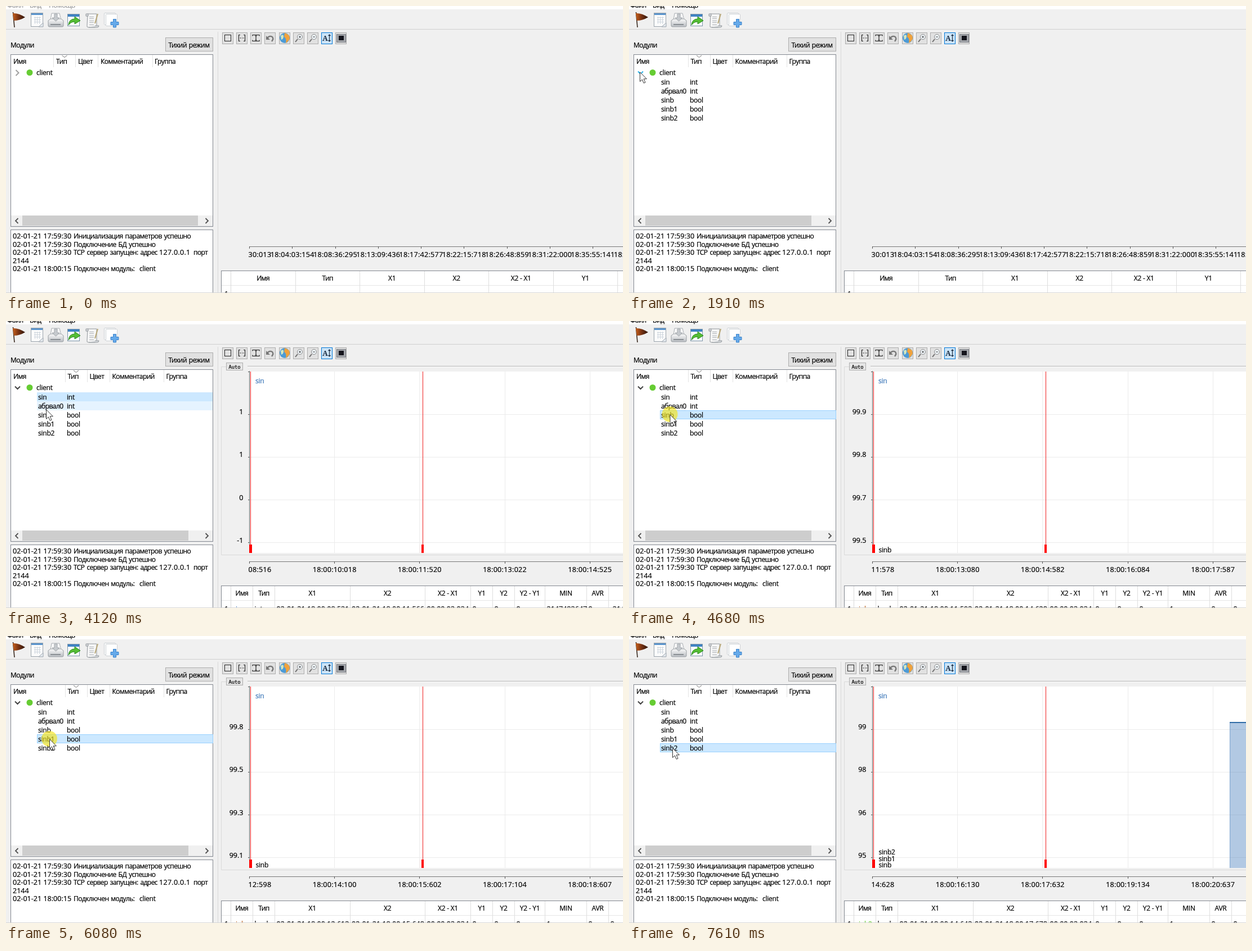
An HTML page for the animation above (8 s loop, 1096 by 511 pixels).

```html
<!DOCTYPE html>
<html lang="ru">
<head>
<meta charset="utf-8">
<title>Модули</title>
<style>
  html, body { margin: 0; width: 100%; height: 100%; overflow: hidden; background: #f0f0f0; }
  svg { display: block; }
  text { font: 12px "Open Sans", "Noto Sans", sans-serif; letter-spacing: -.25px; white-space: pre; stroke-width: .22px; }
  .cyr { letter-spacing: -.55px; word-spacing: 1.3px; }
  .num { font-size: 12.55px; letter-spacing: 0; }
  .wide { font-size: 12.55px; letter-spacing: .27px; }
  .mono { font: 8.8px "DejaVu Sans Mono", monospace; letter-spacing: 0; }
  rect, line { shape-rendering: crispEdges; }
</style>
</head>
<body>
<svg width="1096" height="511" viewBox="0 0 1096 511">
  <defs>
    <clipPath id="axis"><rect x="431" y="420" width="665" height="40"/></clipPath>
    <linearGradient id="flag"><stop offset="0" stop-color="#c8601c"/><stop offset=".45" stop-color="#7a3414"/><stop offset="1" stop-color="#2a130b"/></linearGradient>
    <linearGradient id="metal" x2="0" y2="1"><stop offset="0" stop-color="#fafafa"/><stop offset="1" stop-color="#b9bdc2"/></linearGradient>
  </defs>
  <g id="base"></g>
  <g id="live"></g>
</svg>
<script>
const LOOP = 8000;
const $ = id => document.getElementById(id);

const line = (x1, y1, x2, y2, c, w = 1) =>
  `<line x1="${x1}" y1="${y1}" x2="${x2}" y2="${y2}" stroke="${c}" stroke-width="${w}"/>`;
const fill = (x, y, w, h, c) => `<rect x="${x}" y="${y}" width="${w}" height="${h}" fill="${c}"/>`;
const box = (x, y, w, h, c, edge) =>
  `<rect x="${x + .5}" y="${y + .5}" width="${w - 1}" height="${h - 1}" fill="${c}" stroke="${edge}"/>`;
const path = (d, stroke, w = 1, c = 'none') =>
  `<path d="${d}" fill="${c}" stroke="${stroke}" stroke-width="${w}"/>`;
const disc = (x, y, r, c, extra = '') => `<circle cx="${x}" cy="${y}" r="${r}" fill="${c}" ${extra}/>`;
const kind = s => /[а-я]/i.test(s) ? 'cyr' : /^[\d\s:.-]+$/.test(s) ? 'num' : '';
const text = (x, y, s, c = '#000', anchor = 'start', cls = kind(s)) =>
  `<text x="${x}" y="${y}" class="${cls}" fill="${c}" stroke="${c}" text-anchor="${anchor}">${s}</text>`;
const range = n => [...Array(n).keys()];

const pad = (n, w = 2) => String(n).padStart(w, '0');
const clock = ms => {
  const s = Math.floor(ms / 1000);
  return [pad(Math.floor(s / 3600)), pad(Math.floor(s / 60) % 60), pad(s % 60), pad(Math.floor(ms % 1000), 3)].join(':');
};
const SIX_PM = 18 * 3600e3;

// Timeline
const moves = [ // start, end, steps, x, y
  [180, 180, 1, 727, 393], [250, 320, 2, 537, 312], [570, 730, 3, 127, 195],
  [980, 1620, 9, 19, 117], [2310, 2950, 9, 65, 138],
  [3870, 4120, 4, 71, 157], [4190, 4350, 3, 72.5, 166],
  [5370, 5530, 3, 73, 173], [5610, 5690, 2, 77, 183],
  [6560, 6770, 4, 77, 192], [6850, 6850, 1, 77, 193], [7000, 7170, 3, 77, 199]
];
const clicks = [[1830, 1910], [3190, 3320], [3400, 3490], [4580, 4750],
  [4900, 5050], [6010, 6160], [7310, 7390], [7530, 7610]];
const picks = [[3190, 0], [4580, 2], [6010, 3], [7310, 4]];
const plots = [ // time, window start, scale
  [3400, 7500, '1 1 0 -1'], [4030, 8516, '1 1 0 -1'],
  [4660, 11578, '99.9 99.8 99.7 99.5'], [5530, 12598, '99.8 99.5 99.3 99.1'],
  [6380, 13614, '99.5 99.1 98.6 98.1'], [7390, 14628, '99 98 96 95']
];
const series = [[3400, 'sin', '#3a75b8'], [4660, 'sinb', '#b8601c'], [6090, 'sinb1', '#66cc33'], [7610, 'sinb2', '#66cc33']];
const FOCUS = 1830, EXPAND = 1910, DATA = 7390;
const rows = [['sin', 'int'], ['абрвал0', 'int'], ['sinb', 'bool'], ['sinb1', 'bool'], ['sinb2', 'bool']];

const last = (list, t) => list.filter(e => e[0] <= t).pop();
const ease = p => p * p * (3 - 2 * p);

function pointer(t) {
  let pos = null;
  for (const [t0, t1, n, x, y] of moves) {
    if (t < t0) break;
    const gap = n > 1 ? (t1 - t0) / (n - 1) : 1;
    const i = Math.min(n - 1, Math.floor((t - t0) / gap + 1e-6));
    const p = ease((i + 1) / n), from = pos || [x, y];
    pos = [from[0] + (x - from[0]) * p, from[1] + (y - from[1]) * p];
  }
  return pos && pos.map(v => Math.round(v * 2) / 2);
}

// Fixed parts
function toolbarIcons() {
  let s = path('M12.5 11L15 38', '#3a2a20', 1.6) + path('M12 13Q22 12 34 20Q24 26 14 26Z', 'none', 0, 'url(#flag)');
  s += box(44, 12, 22, 25, '#fcfcfc', '#9aa3ac') + fill(45, 13, 20, 3, '#5a94cc');
  s += range(3).map(i => line(50, 20.5 + i * 4, 62, 20.5 + i * 4, '#cdd5dd') + line(51.5 + i * 4, 19, 51.5 + i * 4, 32, '#cdd5dd')).join('');
  s += path('M58 37L66 30V37Z', '#9aa3ac', 1, '#e6ebf0');
  s += path('M79 25L81 13H95L98 25', '#a9aeb3', 1, '#f8f8f8') + path('M75 26L79 23H98L102 26V35Q102 37 100 37H77Q75 37 75 35Z', '#9a9fa4', 1, 'url(#metal)');
  s += path('M86 14H91V21H95L88.5 27L82 21H86Z', '#a2a7ac', 1, '#c6cace') + fill(79, 32, 18, 2, '#8a8f94');
  s += box(109, 14, 22, 22, '#f8fbfd', '#7d94a8') + fill(110, 15, 20, 4, '#3f83c4');
  s += path('M111 34Q112 23 122 23V19L132 26L122 32V28Q115 28 111 34Z', '#2b8a1e', 1, '#55bd35');
  s += path('M145 14H161V35Q161 38 158 38H146Q143 38 144 34Z', '#92979c', 1, '#f6f6f6') + path('M142 14H146V18H142ZM158 35H165Q165 38 162 38H147', '#92979c', 1, '#d9dcdf');
  s += range(5).map(i => line(148, 19 + i * 3.5, 156, 19 + i * 3.5, '#a9aeb3')).join('') + path('M163 14L158 31', '#b9a878', 2);
  s += `<rect x="174.5" y="12.5" width="20" height="21" rx="2" fill="#fafafa" stroke="#cdd1d5"/><rect x="177.5" y="14.5" width="20" height="21" rx="2" fill="#fff" stroke="#cdd1d5"/>`;
  return s + path('M190.5 23.5H195.5V28.5H200V33.5H195.5V38H190.5V33.5H186V28.5H190.5Z', '#3d83cb', 1, '#66aaea');
}

function chartButtons() {
  const lens = mark => path('M8 12L4 17', '#6e6e6e', 2) + disc(12, 8, 4.5, '#eef4f8', 'stroke="#888"') + path(mark, '#444', 1);
  const icons = [
    box(4, 4, 12, 12, 'none', '#222'),
    path('M7 4.5H4.5V15.5H7M13 4.5H15.5V15.5H13M7 10H9M11 10H13', '#222', 1.2),
    path('M4 6.5V4.5H16V6.5M4 13.5V15.5H16V13.5M10 6V14M8 6H12M8 14H12', '#222', 1.2),
    path('M5 10Q9 5 14 8Q17 11 13 16', '#777', 2.4) + path('M3 6V13H10Z', 'none', 0, '#777'),
    disc(10, 10, 9, '#4d9bd6') + path('M10 1Q19 3 19 11Q16 17 12 19Q14 11 9 8Z', 'none', 0, '#f0a23c') + path('M3 6Q8 2 8 7Q8 12 4 13Z', 'none', 0, '#d5e8c0'),
    lens('M10 8H14M12 6V10'),
    lens('M10 8H14'),
    `<text x="2" y="15" fill="#1a2b40" style="font:bold 13px 'Noto Serif',serif">A</text>` + path('M14.5 4V16M12.5 6L14.5 4L16.5 6M12.5 14L14.5 16L16.5 14', '#1a2b40', 1.2),
    box(2, 3, 17, 15, '#a4a7ac', '#777a80') + fill(6, 6, 9, 8, '#14141c')
  ];
  return icons.map((icon, i) => {
    const on = i === 7;
    return `<g transform="translate(${Math.round(384 + i * 25.15)} 47)">` +
      box(0, 0, 20, 21, on ? '#cce4f7' : '#e1e1e1', on ? '#0078d7' : '#adadad') + icon + '</g>';
  }).join('');
}

function log() {
  const stamp = (y, time) => text(12, y, '02-01-21 ' + time);
  return box(8, 398, 360, 130, '#fff', '#828790') +
    stamp(414, '17:59:30') + text(120, 414, 'Инициализация параметров успешно') +
    stamp(428.5, '17:59:30') + text(120, 428.5, 'Подключение БД успешно') +
    stamp(443, '17:59:30') + text(120, 443, 'TCP сервер запущен: адрес') +
    text(272, 443, '127.0.0.1', '#000', 'start', 'wide') + text(333, 443, 'порт') +
    text(12, 457.5, '2144') +
    stamp(472, '18:00:15') + text(120, 472, 'Подключен модуль:') + text(237, 472, 'client');
}

$('base').innerHTML = fill(0, 0, 1096, 511, '#f0f0f0') + fill(0, 0, 1096, 6, '#fff') +
  line(0, 41.5, 1096, 41.5, '#cfcfcf') + line(376.5, 46, 376.5, 511, '#d9d9d9') +
  toolbarIcons() + chartButtons() + text(8, 74, 'Модули') +
  box(283, 56, 85, 25, '#e1e1e1', '#adadad') + text(325, 74, 'Тихий режим', '#000', 'middle') + log();

// Changing parts
function tree(t, pos, pick) {
  const open = t >= EXPAND, dx = open ? 20.5 : 0;
  const [px, py] = pos || [-1, -1];
  const onRow = open && px >= 55 && px < 367 && py >= 127 ? Math.floor((py - 127) / 16) : -1;
  const onTop = py >= 111 && py < 127;
  const onMark = onTop && px < 30;
  let s = box(8, 86, 360, 307, '#fff', '#828790');
  s += [84.5, 123.5, 163.5, 260].map(x => line(x + dx, 87, x + dx, 109, '#e3e3e3')).join('');
  s += path(`M${99.5 + dx} 88L${104 + dx} 91.5L${108.5 + dx} 88`, '#777');
  s += text(13, 103, 'Имя');
  s += [[89, 'Тип'], [128, 'Цвет'], [168, 'Комментарий'], [264, 'Группа']].map(([x, w]) => text(x + dx, 103, w)).join('');
  if (onTop && px >= 37 && px < 367) s += fill(37, 111, 330, 16, '#e5f3ff');
  s += open ? path('M16 116.5L20.5 121L25 116.5', onMark ? '#29b2ea' : '#404040', 2)
            : path('M17.5 114L22.5 119L17.5 124', onMark ? '#29b2ea' : '#a0a0a0', 2);
  s += disc(42, 118.5, 5.5, '#66cc33') + text(54, 123, 'client');
  if (open) rows.forEach(([name, type], i) => {
    const y = 127 + i * 16;
    if (i === pick) s += i === onRow ? box(55, y, 313, 16, '#cce8ff', '#99d1ff') : fill(55, y, 312, 16, '#cce8ff');
    else if (i === onRow) s += fill(55, y, 312, 16, '#e5f3ff');
    s += text(57, y + 13, name) + text(108, y + 13, type);
  });
  s += fill(9, 373, 358, 19, '#f0f0f0') + fill(29, 373, open ? 294.5 : 312, 18, '#cdcdcd');
  return s + path('M21.5 378L17 382.5L21.5 387M354.5 378L359 382.5L354.5 387', '#505050', 1.8);
}

function timeAxis(start, step, gap) {
  const ticks = range(Math.ceil(700 / gap));
  return line(432, 428.5, 1096, 428.5, '#777') + '<g clip-path="url(#axis)">' + ticks.map(i => {
    const x = 432.5 + i * gap;
    return line(x, 428, x, 432, '#555') + text(x, 447, clock(start + i * step), '#000', 'middle', 'wide');
  }).join('') + '</g>';
}

function table(edges, heads, cells, tint) {
  let s = box(382, 471, 730, 60, '#fff', '#828790') + line(383, 497.5, 1096, 497.5, '#e6e6e6');
  s += line(399.5, 472, 399.5, 511, '#d8d8d8') + text(388, 517, '1');
  edges.forEach((x, i) => {
    s += line(x, 472, x, 511, '#dedede');
    const left = i ? edges[i - 1] : 399.5;
    if (heads[i]) s += text((left + x) / 2, 489, heads[i], '#000', 'middle');
    if (cells[i]) s += text(left + 3, 517, cells[i], i ? '#000' : tint);
  });
  return s;
}

function emptyChart() {
  return timeAxis(SIX_PM - 29987, 273141, 76.25) +
    table(range(6).map(i => 514 + i * 114.5), ['Имя', 'Тип', 'X1', 'X2', 'X2 - X1', 'Y1'], []);
}

function chart(t, [, start, scale]) {
  const shown = series.filter(e => e[0] <= t);
  const [, name, tint] = shown[shown.length - 1];
  let s = path('M391 81.5H382.5V416.5H1096', '#d9d9d9') + line(429, 80.5, 1096, 80.5, '#b4b4b4') + line(429, 81.5, 1096, 81.5, '#fff');
  s += box(391, 74, 30, 14, '#e6e6e6', '#adadad') + text(406, 84.5, 'Auto', '#000', 'middle', 'mono');
  s += fill(432, 90, 664, 323, '#fff');
  s += range(4).map(i => line(583.7 + i * 151.2, 90, 583.7 + i * 151.2, 413, '#ebebeb')).join('');
  s += line(432.5, 89, 432.5, 413, '#666') + line(430, 90, 433, 90, '#555');
  scale.split(' ').forEach((v, i) => {
    const y = 166 + i * 76.3;
    s += line(433, y, 1096, y, '#ebebeb') + line(430, y, 433, y, '#555') + text(421.5, y, v, '#000', 'end');
  });
  if (t >= DATA) {
    s += fill(1067, 154, 29, 259, 'rgba(64,120,184,.4)') + line(1067.5, 154, 1067.5, 413, '#7fa5cf') + line(1067, 154, 1096, 154, '#2f6ca6', 2);
  }
  s += text(443, 111, 'sin', '#3a75b8');
  s += shown.slice(1).map((e, i) => text(443.5, 412 - i * 11.5, e[1])).join('');
  s += [434.5, 740].map(x => line(x, 90, x, 413, '#f02020') + fill(x - 2.5, 398, 4.5, 15, '#f00')).join('');
  s += timeAxis(SIX_PM + start, 1502.25, 151.2);

  const x1 = SIX_PM + start + 15, date = '02-01-21 ', plain = name === 'sin';
  const cells = [name, plain ? 'int' : 'bool', date + clock(x1), date + clock(x1 + 3035), '00:00:03:034', '0', '0', '0',
    plain ? '2147483647' : '1', '0', plain ? '-2147483648' : '0'];
  return s + table([438.5, 477.5, 611, 744.5, 825.5, 864.5, 903.5, 957.5, 1031.5, 1070.5, 1150],
    ['Имя', 'Тип', 'X1', 'X2', 'X2 - X1', 'Y1', 'Y2', 'Y2 - Y1', 'MIN', 'AVR'], cells, tint);
}

function mouse(t, pos) {
  if (!pos) return '';
  const pressed = clicks.some(([a, b]) => t >= a && t < b);
  return (pressed ? disc(pos[0], pos[1], 14, '#f2e41c', 'opacity=".65"') : '') +
    `<g transform="translate(${pos[0]} ${pos[1]})">` +
    path('M.5 .8V17.5L4.4 13.9L7.2 20.3L10 19.1L7.2 12.8H12.4Z', '#333', 1, '#fff') + '</g>';
}

function scene(t) {
  const pos = pointer(t), pick = last(picks, t), plot = last(plots, t);
  const ink = t < FOCUS ? '#9a9a9a' : '#000';
  return text(2, 3, 'Файл', ink) + text(42, 3, 'Вид', ink) + text(76, 3, 'Помощь', ink) +
    tree(t, pos, pick ? pick[1] : -1) + (plot ? chart(t, plot) : emptyChart()) +
    line(0, 510.5, 1096, 510.5, '#d6d6d6') + mouse(t, pos);
}

const began = performance.now();
let drawn = '';
function frame() {
  const next = scene((performance.now() - began) % LOOP);
  if (next !== drawn) $('live').innerHTML = drawn = next;
  requestAnimationFrame(frame);
}
frame();
</script>
</body>
</html>
```
